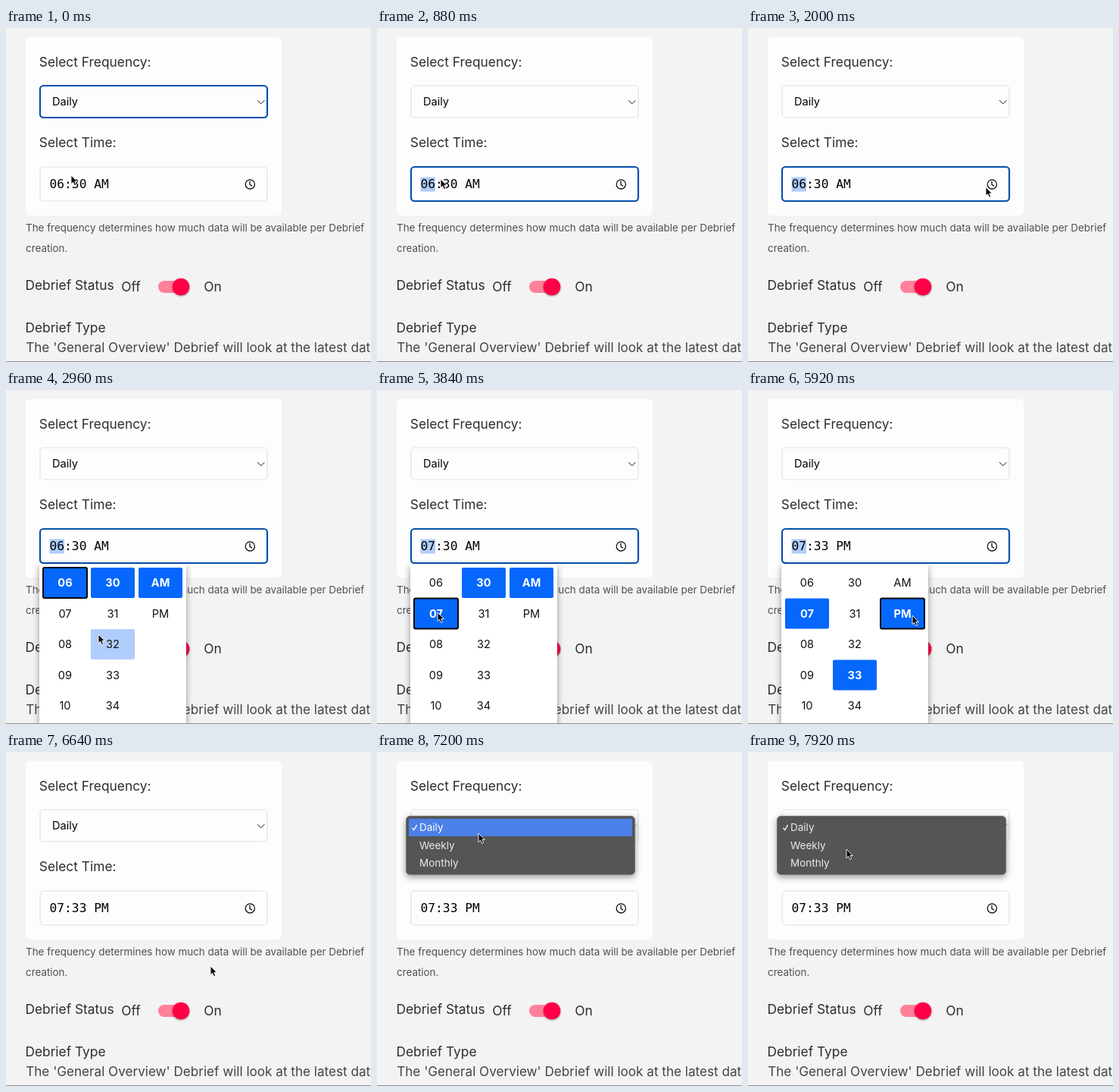
An HTML page for the animation above (8000 ms loop, 482 px wide and 440 px high).

```html
<!DOCTYPE html>
<html lang="en">
<head>
<meta charset="utf-8">
<title>Debrief schedule</title>
<style>
  html, body { margin: 0; width: 100%; height: 100%; overflow: hidden; background: #f3f3f3; }
  svg { display: block; width: 482px; height: 440px; font-family: Inter, sans-serif; font-size: 17.35px; fill: #2d2d2d; }
  .note { font-size: 13.4px; fill: #505050; }
  .value { font-size: 14.6px; fill: #000; }
  .time { font: 16.25px "DejaVu Sans Mono", monospace; fill: #000; white-space: pre; }
  .field { fill: #fdfdfd; stroke: #e2e2e2; stroke-width: 1.2; }
  .field.focus { stroke: #0751ad; stroke-width: 2.2; }
  .cell rect { fill: none; }
  .cell text { font-size: 14.6px; fill: #111; text-anchor: middle; }
  .cell.hover rect { fill: #b0cdfb; }
  .cell.on rect { fill: #0567fb; }
  .cell.on text { fill: #fff; font-weight: 700; }
  .cell.focus rect { stroke: #080808; stroke-width: 2; }
  .option rect { fill: none; }
  .option text { font-size: 13.5px; fill: #eaeaea; }
  .option.hover rect { fill: #4a80e8; }
  .option.hover text { fill: #fff; }
  .line { fill: none; stroke: #111; stroke-width: 1.3; }
  .line.thin { stroke-width: 1; }
  .shade { filter: drop-shadow(0 3px 4px #0006); }
</style>
</head>
<body>
<svg viewBox="0 0 482 440">
  <rect width="482" height="440" fill="#f3f3f3"/>
  <rect x="26" y="12" width="338" height="235" rx="5" fill="#fdfdfd"/>
  <text x="43.8" y="51">Select Frequency:</text>
  <rect id="frequency" class="field" x="45" y="76" width="300" height="42" rx="4.5"/>
  <text class="value" x="61" y="102.4">Daily</text>
  <path class="line thin" d="M332 95.2l4.7 4.7 4.7-4.7"/>
  <text x="43.8" y="157.3">Select Time:</text>
  <rect id="timeField" class="field" x="45" y="183" width="300" height="45" rx="4.5"/>
  <rect id="hourMark" x="57.5" y="196.5" width="19.5" height="19" fill="#aecdf8"/>
  <text id="timeText" class="time" x="57.5" y="211.4"></text>
  <circle class="line" cx="322.3" cy="205.9" r="6.1"/>
  <path class="line" d="M322 201.8v4.5l3.2 2"/>
  <text class="note" x="26" y="268">The frequency determines how much data will be available per Debrief</text>
  <text class="note" x="26" y="295">creation.</text>
  <text x="25.4" y="345">Debrief Status</text>
  <text x="152.3" y="347.4">Off</text>
  <rect x="201" y="333" width="41" height="16" rx="8" fill="#ff8099"/>
  <circle cx="231" cy="341" r="11.3" fill="#ff0046" style="filter:drop-shadow(0 1px 1.2px #0006)"/>
  <text x="261.3" y="347.4">On</text>
  <text x="25.4" y="400.6">Debrief Type</text>
  <text x="26.2" y="426.8" font-size="17.12" fill="#444">The 'General Overview' Debrief will look at the latest dat</text>

  <g id="picker">
    <rect class="shade" x="44" y="229.5" width="194" height="230" fill="#fff"/>
  </g>
  <g id="menu">
    <rect class="shade" x="38.5" y="84.5" width="302" height="77" rx="5" fill="#555" stroke="#777"/>
    <path id="check" d="M46.5 99.8l2.2 3 4-6.6" fill="none" stroke="#fff" stroke-width="1.3"/>
  </g>
  <rect y="439" width="482" height="1" fill="#8c8c8c"/>
  <path id="cursor" d="M0 0V11.6L2.6 9.3 4.5 13.6 6.6 12.7 4.8 8.5H8.3Z" fill="#080808" stroke="#fff" stroke-width=".9" stroke-linejoin="round"/>
</svg>
<script>
const LOOP = 8000, STEP = 80;
const $ = id => document.getElementById(id);

// Cursor stops: time, x, y
const path = [
  [0, 86, 194], [320, 84, 199], [960, 84, 199], [1680, 312, 207], [2000, 314, 209.5],
  [2320, 316, 207], [2800, 126, 316], [2960, 122, 322], [3280, 78, 294], [3840, 80, 293],
  [4480, 139, 362], [4640, 141, 364], [5040, 141, 368], [5520, 210, 298], [5920, 217, 297],
  [6160, 222, 298], [6400, 278, 296], [6640, 270, 282], [6960, 140, 98], [7200, 134, 107],
  [7440, 131, 124], [7920, 130, 128]
];

// State changes: each entry overrides what came before
const changes = [
  [0, { field: 'frequency', hour: '06', minute: '30', half: 'AM', focus: '06', open: '' }],
  [480, { field: 'timeField' }],
  [2240, { open: 'picker' }],
  [3520, { hour: '07', focus: '07' }],
  [4960, { minute: '33', focus: '33' }],
  [5680, { half: 'PM', focus: 'PM' }],
  [6400, { open: '', field: '' }],
  [6960, { open: 'menu' }],
  [7920, { blink: true }]
];

function add(parent, tag, attrs, text = '') {
  const el = document.createElementNS('http://www.w3.org/2000/svg', tag);
  for (const key in attrs) el.setAttribute(key, attrs[key]);
  el.textContent = text;
  return parent.appendChild(el);
}

function addBox(parent, kind, label, x, y, w, h, textX, baseline) {
  const el = add(parent, 'g', { class: kind });
  add(el, 'rect', { x, y, width: w, height: h, rx: kind === 'cell' ? 2 : 0 });
  add(el, 'text', { x: textX, y: baseline }, label);
  return { el, label, x, y, w, h };
}

const cells = [['06', '07', '08', '09', '10'], ['30', '31', '32', '33', '34'], ['AM', 'PM']]
  .flatMap((column, c) => column.map((label, r) => {
    const x = 49 + 63 * c, y = 234 + 40.5 * r;
    return addBox($('picker'), 'cell', label, x, y, 58, 40, x + 29, y + 25.4);
  }));

const options = ['Daily', 'Weekly', 'Monthly'].map((label, r) =>
  addBox($('menu'), 'option', label, 42, 88 + 23.3 * r, 295, 23, 56, 104.3 + 23.3 * r));
$('menu').append($('check'));

function cursorAt(t) {
  const i = path.findIndex(stop => stop[0] > t);
  if (i < 0) return path[path.length - 1].slice(1);
  const [t0, x0, y0] = path[i - 1], [t1, x1, y1] = path[i];
  const p = (t - t0) / (t1 - t0), ease = p * p * (3 - 2 * p);
  return [x0 + (x1 - x0) * ease, y0 + (y1 - y0) * ease];
}

const inside = (b, x, y) => x >= b.x && x < b.x + b.w && y >= b.y && y < b.y + b.h;
const show = (id, on) => $(id).setAttribute('visibility', on ? 'visible' : 'hidden');

function draw(t) {
  const s = Object.assign({}, ...changes.filter(c => c[0] <= t).map(c => c[1]));
  const [x, y] = cursorAt(t);
  for (const id of ['frequency', 'timeField']) $(id).classList.toggle('focus', s.field === id);
  for (const id of ['picker', 'menu']) show(id, s.open === id);
  show('hourMark', s.field === 'timeField');
  $('timeText').textContent = `${s.hour}:${s.minute} ${s.half}`;
  for (const cell of cells) {
    const list = cell.el.classList;
    list.toggle('on', [s.hour, s.minute, s.half].includes(cell.label));
    list.toggle('focus', s.focus === cell.label);
    list.toggle('hover', inside(cell, x, y));
  }
  for (const option of options)
    option.el.classList.toggle('hover', !s.blink && inside(option, x, y));
  $('cursor').setAttribute('transform', `translate(${x} ${y})`);
}

const start = performance.now();
function tick() {
  const t = (performance.now() - start) % LOOP;
  draw(Math.floor(t / STEP) * STEP);
  requestAnimationFrame(tick);
}
draw(0);
requestAnimationFrame(tick);
</script>
</body>
</html>
```
